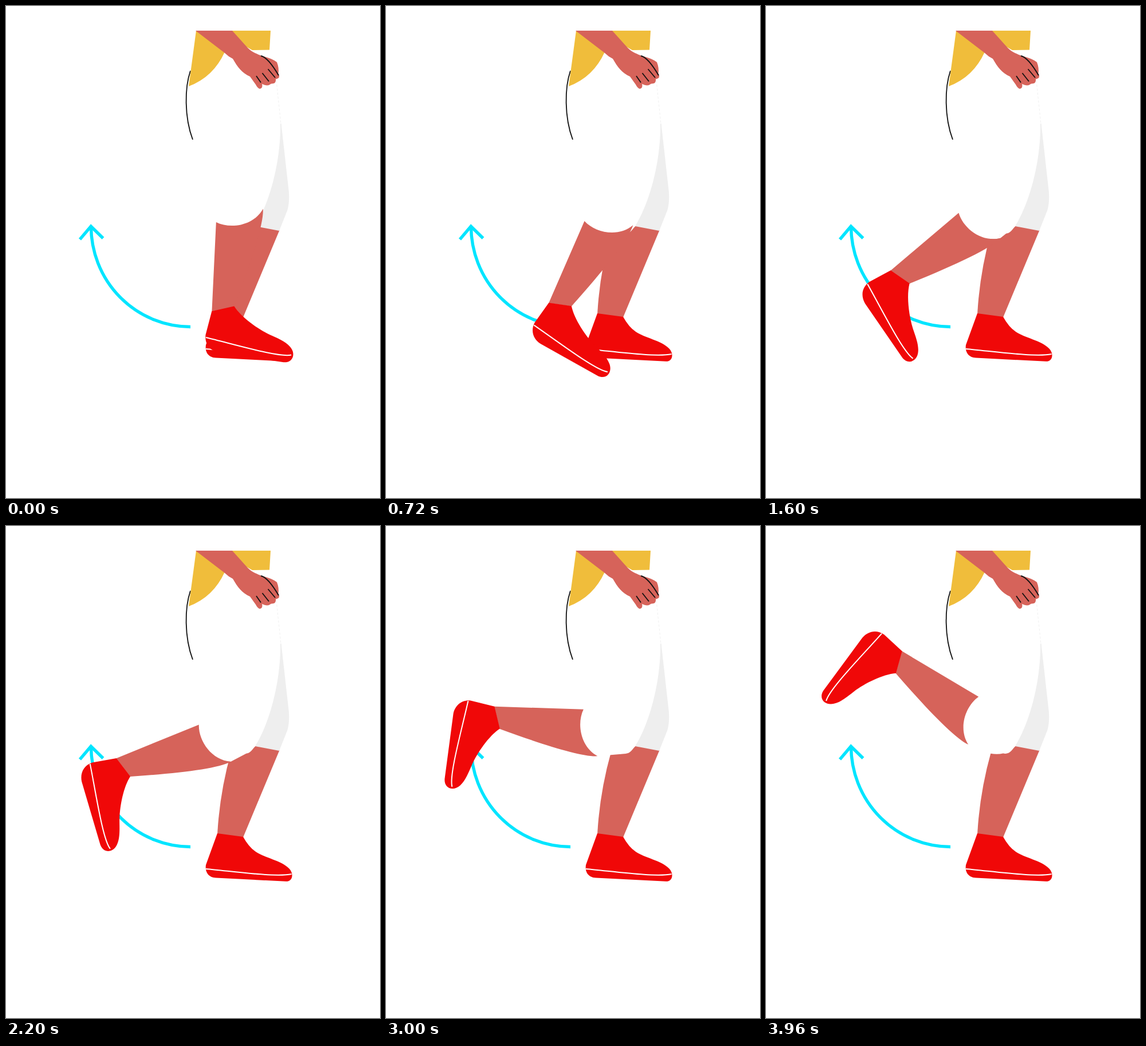
An HTML page for the animation above (4000 ms loop, 653 by 858 pixels).

```html
<!DOCTYPE html>
<html lang="en">
<head>
<meta charset="utf-8">
<title>Leg curl</title>
<style>
  html, body { margin: 0; width: 100%; height: 100%; overflow: hidden; background: #fff; }
  svg { display: block; width: 100%; height: 100%; }
  .skin { fill: #d6635a; }
  .shoe { fill: #f00808; }
  .shirt { fill: #f0bd3b; }
  .shade { fill: #eee; }
  .cloth { fill: #fff; }
  .line { fill: none; stroke: #111; stroke-width: 1.8; }
  .stripe { fill: none; stroke: #fff; stroke-width: 2; }
  .arrow { fill: none; stroke: #00e5ff; stroke-width: 5.4; }
</style>
</head>
<body>
<svg viewBox="0 0 653 858">
  <g class="arrow">
    <path d="M322 559.5A174 175.5 0 0 1 148.5 384"/>
    <path d="M129 407L148.3 384.3 169.5 405"/>
  </g>

  <!-- standing leg -->
  <path class="skin" d="M393 394Q373 465 369 538L414 543 477.5 391 436 383Z"/>
  <path class="shoe" d="M369 536L349 591C347 604 354 613 366 613.5L489 619.8C501 620 503 606 494 597C480 583 452 579 436 568Q424 560 414 542Z"/>
  <path class="stripe" d="M349 598C395 602 470 613 498.5 607"/>

  <!-- shorts -->
  <path class="shade" d="M479 205C480 260 465 335 435 384L477 392 491 357Q495 345 494 325L480.5 205Z"/>
  <path d="M472 130L480 206" fill="none" stroke="#f1f1f1" stroke-dasharray="4 3"/>
  <path class="cloth" d="M380 394Q400 400 414 396.5C426 399 429 390 435.5 384L440 340 380 340Z"/>
  <path class="cloth" id="thigh"/>

  <!-- curling leg, with its origin at the back of the ankle -->
  <g id="shin">
    <path class="cloth" d="M41 -150C63 -132 104 -130 126 -155L83 -190Z"/>
    <path class="skin" d="M0 .5L41 -150C63 -132 104 -130 126 -155C122 -130 88 -72 40 .5Z"/>
    <path class="shoe" d="M0 0H40C48 22 72 48 90 62C102 71 114 79 120 90C128 104 119 119 103 114L-4 73C-17 67 -25 54 -19.5 38Z"/>
    <path class="stripe" d="M-20 42.5C28 66 98 105 119 104.5"/>
  </g>

  <!-- upper body -->
  <path class="line" d="M322 113C312 142 311 193 326 233"/>
  <path class="shirt" d="M332 43H462L460 76.5 430 77 400 60 382 80Q362 124 319 140Z"/>
  <path class="skin" d="M331 43H395L422 73C430 81 440 84 446 87Q464 91 473 98Q477 108 475.5 118Q480 126 471 127.5Q472 136 463 135.5Q457 141 447 136Q449 143 443 144.5Q439 143 436 137L426 123C412 117 404 106 396 92Q388 88 382 82Z"/>
  <path class="line" d="M445 87C455 89 466 104 476 121M437 122L445 133.5M447.5 117L459 131.5M457.5 110L470 125"/>
</svg>
<script>
const LOOP = 4000, STEP = 40;
const KNEE = [75.3, -183];   // in the curling leg's own space
const HEM = [126, -155];

// time, knee x, knee y, angle
const keys = [
  [0, 393.2, 337.3, -12.5],
  [720, 385.2, 347.2, 8.3],
  [1600, 383.4, 352.9, 34.5],
  [2200, 383.8, 353.6, 52.6],
  [3000, 384.9, 345.5, 76.6],
  [3400, 387.6, 342.6, 88.7],
  [3960, 393.8, 339.7, 105.5]
];
const shin = document.getElementById('shin');
const thigh = document.getElementById('thigh');

function slope(i, c) {
  const a = keys[Math.max(i - 1, 0)], b = keys[Math.min(i + 1, keys.length - 1)];
  return (b[c] - a[c]) / (b[0] - a[0]);
}

function sample(t, c) {
  let i = 0;
  while (i < keys.length - 2 && t >= keys[i + 1][0]) i++;
  const a = keys[i], b = keys[i + 1], d = b[0] - a[0];
  const u = (t - a[0]) / d, v = 1 - u;
  return v * v * (1 + 2 * u) * a[c] + u * u * (3 - 2 * u) * b[c]
    + d * u * v * (v * slope(i, c) - u * slope(i + 1, c));
}

function draw(t) {
  const [x, y, deg] = [1, 2, 3].map(c => sample(t, c));
  const r = deg * Math.PI / 180, cos = Math.cos(r), sin = Math.sin(r);
  const dx = HEM[0] - KNEE[0], dy = HEM[1] - KNEE[1];
  const hx = x + dx * cos - dy * sin, hy = y + dx * sin + dy * cos;
  shin.setAttribute('transform',
    `translate(${x} ${y}) rotate(${deg}) translate(${-KNEE[0]} ${-KNEE[1]})`);
  thigh.setAttribute('d', `M${hx} ${hy}L419 397 440 345 380 320Z`);
}

const start = performance.now();
function tick() {
  const t = (performance.now() - start) % LOOP;
  draw(Math.floor(t / STEP) * STEP);
  requestAnimationFrame(tick);
}
tick();
</script>
</body>
</html>
```
